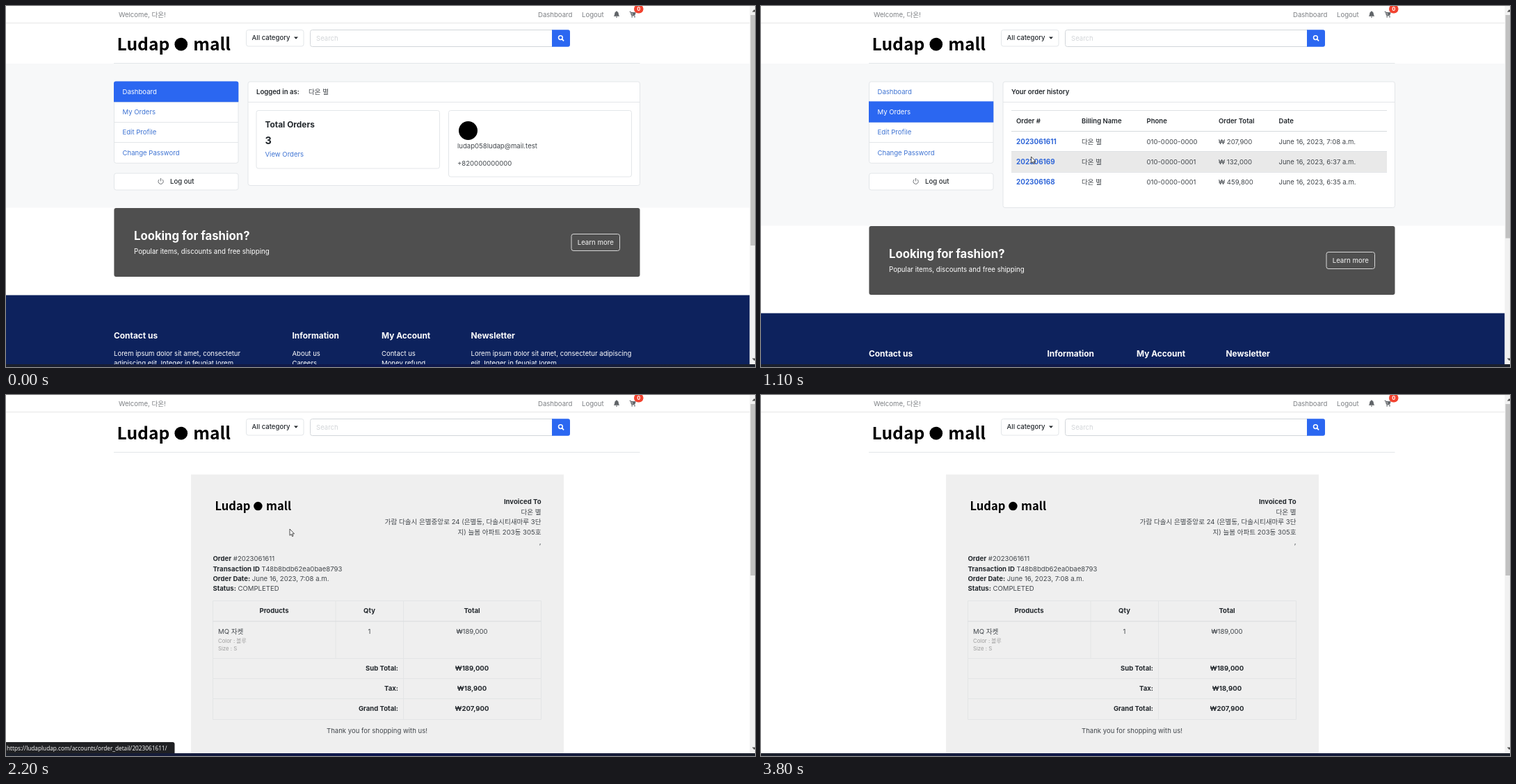
Write an HTML page that moves like this. It is 1077 px wide and 520 px high and loops after 4000 ms.

```html
<!DOCTYPE html>
<html lang="en">
<head>
<meta charset="utf-8">
<title>Shop account</title>
<style>
  html, body { margin: 0; width: 100%; height: 100%; overflow: hidden; background: #fff; }
  svg { display: block; width: 1077px; height: 520px; }
  text { font-family: Inter, 'Noto Sans CJK KR', 'Noto Sans CJK JP', 'Noto Sans CJK', sans-serif; white-space: pre; }
  .brand { font-family: 'Noto Sans CJK KR', 'Noto Sans CJK JP', 'Noto Sans CJK', sans-serif; }
  .url { font-family: 'Open Sans', 'Noto Sans', sans-serif; }
</style>
</head>
<body>
<svg id="stage" viewBox="0 0 1077 520" xmlns="http://www.w3.org/2000/svg"></svg>
<script>
const REM = 9.57, INK = '#42474c', DARK = '#23282d', MUTED = '#7c7f83';
const BLUE = '#2b67f1', LINK = '#3f74d3', LINE = '#e3e6e9', GREY = '#f7f8f9';
const PAGE_RIGHT = 1069.5;

const text = (x, y, str, { size = REM, weight = 400, fill = INK, anchor = 'start', cls = '', id = '' } = {}) =>
  `<text x="${x}" y="${y}" font-size="${size}" font-weight="${weight}" fill="${fill}" text-anchor="${anchor}" class="${cls}" id="${id}">${str}</text>`;
const bold = (x, y, str, opt = {}) => text(x, y, str, { weight: 700, fill: DARK, ...opt });
const rect = (x, y, x2, y2, fill, stroke = 'none', r = 0, extra = '') =>
  `<rect x="${x}" y="${y}" width="${x2 - x}" height="${y2 - y}" rx="${r}" fill="${fill}" stroke="${stroke}" ${extra}/>`;
const card = (x, y, x2, y2) => rect(x, y, x2, y2, '#fff', LINE, 3);
const path = (d, fill, stroke = 'none', width = 1) =>
  `<path d="${d}" fill="${fill}" stroke="${stroke}" stroke-width="${width}"/>`;
const line = (d, stroke = LINE) => path(d, 'none', stroke);
const dot = (x, y, r, fill = '#000') => `<circle cx="${x}" cy="${y}" r="${r}" fill="${fill}"/>`;
const group = (id, body) => `<g id="${id}">${body}</g>`;

const brand = (x, y, size) => {
  const opt = { size, weight: 700, fill: '#000', cls: 'brand' };
  return text(x, y, 'Ludap', opt) + dot(x + size * 3.75, y - size * 0.36, size * 0.38) +
    text(x + size * 4.46, y, 'mall', opt);
};

function header() {
  const nav = { fill: MUTED };
  return line(`M0 24.5H${PAGE_RIGHT}`, '#e6e6e6') +
    text(162, 15.5, 'Welcome, 다온!', nav) +
    text(765, 15.5, 'Dashboard', nav) + text(828, 15.5, 'Logout', nav) +
    path('M873.8 14.8q1.4-1.3 1.4-3.8 0-2.5 2.2-2.9v-.8h1.2v.8q2.2.4 2.2 2.9 0 2.5 1.4 3.8zM876.8 15.5h2.4q-.2 1.2-1.2 1.2t-1.2-1.2z', '#606468') +
    path('M896.6 8.2h1.6l1.3 5.6h5M898.6 9.4h6.6l-.8 3h-5z', '#606468', '#606468', 0.9) +
    dot(900.2, 15.6, 0.9, '#606468') + dot(904, 15.6, 0.9, '#606468') +
    rect(903, -2, 916.5, 10.5, '#f2422f', 'none', 6.2) +
    text(909.7, 7.4, '0', { size: 7.4, weight: 700, fill: '#fff', anchor: 'middle' }) +
    brand(159.5, 64, 24.6) +
    rect(345.5, 34.5, 428, 58, '#fff', LINE, 3) +
    text(353.5, 49.3, 'All category', { weight: 500, fill: DARK }) +
    path('M414 44.5h6l-3 3.2z', DARK) +
    rect(437.5, 34.5, 788, 58.5, '#fff', '#d2d6da', 3) +
    text(446, 49.8, 'Search', { fill: '#d3d6d9' }) +
    path('M785 34.2h23q3 0 3 3v18.5q0 3-3 3h-23z', BLUE) +
    `<circle cx="797.4" cy="45.6" r="2.9" fill="none" stroke="#fff" stroke-width="1.5"/>` +
    path('M799.4 47.7l2.7 2.7', 'none', '#fff', 1.7) +
    line('M155 82.5H911.5');
}

function sidebar(active) {
  const names = ['Dashboard', 'My Orders', 'Edit Profile', 'Change Password'];
  const itemTop = i => 108.6 + i * 29.35;
  const labels = names.map((name, i) =>
    text(167.5, itemTop(i) + 17.9, name, { fill: i === active ? '#fff' : LINK })).join('');
  const top = itemTop(active), end = top + 29.7;
  const highlight = active
    ? rect(155, top - 0.6, 334.3, end, BLUE)
    : path(`M155 ${end}V${top + 3}q0-3 3-3h173.3q3 0 3 3V${end}z`, BLUE);
  return card(155.5, 109, 334, 226.3) +
    line('M155 138.5H334M155 167.5H334M155 196.5H334') + highlight + labels +
    card(155.5, 241, 334, 265) +
    path('M220.6 249.8a3.6 3.6 0 1 0 4 0M222.6 248v4.4', 'none', '#6c7074', 1) +
    text(236, 256.2, 'Log out', { weight: 500, fill: DARK });
}

const panel = (bottom, title) =>
  card(348, 109, 911.5, bottom) + line('M348 138.5H911.5') + bold(360, 126.7, title, { weight: 600 });

function dashboard() {
  return rect(0, 83, PAGE_RIGHT, 290.5, GREY) + sidebar(0) +
    panel(258.5, 'Logged in as:') + text(435, 126.7, '다온 별') +
    card(360, 150.5, 623.5, 234) + card(636.5, 150.5, 899.5, 246) +
    bold(372.5, 175.2, 'Total Orders', { size: 11.9 }) +
    bold(372.5, 198.7, '3', { size: 14.4 }) +
    text(372.5, 217.1, 'View Orders', { fill: LINK, id: 'viewLink' }) +
    dot(664.5, 179.5, 13.5) +
    text(649, 205.3, 'ludap058ludap@mail.test') +
    text(649, 229.6, '+820000000000');
}

function orders() {
  const cols = [367, 461, 554.5, 658, 744.5];
  const heads = ['Order #', 'Billing Name', 'Phone', 'Order Total', 'Date'];
  const rows = [
    ['2023061611', '010-0000-0000', '207,900', '7:08'],
    ['202306169', '010-0000-0001', '132,000', '6:37'],
    ['202306168', '010-0000-0001', '459,800', '6:35'],
  ];
  const body = rows.map(([id, phone, total, time], i) => {
    const y = 198.5 + i * 29.4;
    const cells = ['다온 별', phone, '₩ ' + total, `June 16, 2023, ${time} a.m.`];
    return bold(cols[0], y, id, { size: 9.9, fill: '#2f66d8' }) +
      cells.map((cell, c) => text(cols[c + 1], y, cell)).join('');
  }).join('');
  return rect(0, 83, PAGE_RIGHT, 316.5, GREY) + sidebar(1) +
    panel(290.5, 'Your order history') +
    rect(360, 180, 900, 209.4, '#e9e9e9', 'none', 0, 'id="rowHover"') +
    line('M360 150.5H900M360 209.5H900M360 239.5H900', '#dee1e4') + line('M360 180.5H900', '#d6dadd') +
    heads.map((head, i) => bold(cols[i], 168.6, head, { weight: 600 })).join('') + body;
}

function invoice() {
  const right = { anchor: 'end' }, mid = { anchor: 'middle' };
  const pair = (y, label, value) =>
    text(297.5, y, `<tspan font-weight="700" fill="${DARK}">${label}</tspan> ${value}`);
  const totals = [['Sub Total:', '₩189,000'], ['Tax:', '₩18,900'], ['Grand Total:', '₩207,900']];
  const small = { size: 7.75, fill: '#9c9c9c' };
  return rect(266, 114.5, 802, 523, '#efefef') + brand(300.5, 166, 16.5) +
    bold(769.5, 157.3, 'Invoiced To', right) +
    text(769.5, 171.7, '다온 별', right) +
    text(769.5, 186, '가람 다솔시 은별중앙로 24 (은별동, 다솔시티새마루 3단', right) +
    text(769.5, 200.5, '지) 늘봄 아파트 203동 305호', right) +
    text(769.5, 215, ',', right) +
    pair(239.4, 'Order', '#2023061611') +
    pair(253.7, 'Transaction ID', 'T48b8bdb62ea0bae8793') +
    pair(268, 'Order Date:', 'June 16, 2023, 7:08 a.m.') +
    pair(282.4, 'Status:', 'COMPLETED') +
    line('M297.5 296.5H769.5V467.5H297.5zM297.5 379.5H769.5M297.5 408.5H769.5M297.5 437.5H769.5M474 296.5V379.5M571.5 296.5V467.5', '#e3e5e6') +
    line('M297.5 326H769.5', '#d8dbdd') +
    bold(385.5, 314, 'Products', mid) + bold(522.5, 314, 'Qty', mid) + bold(670, 314, 'Total', mid) +
    text(305, 343.7, 'MQ 자켓') +
    text(305, 356.7, 'Color : 블루', small) + text(305, 368.2, 'Size : S', small) +
    text(522.5, 343.7, '1', mid) + text(670, 343.7, '₩189,000', mid) +
    totals.map(([label, value], i) =>
      bold(564, 396.6 + i * 29.3, label, right) + bold(670, 396.6 + i * 29.3, value, mid)).join('') +
    text(533.5, 487.4, 'Thank you for shopping with us!', mid);
}

// Banner and footer, with the banner's top edge at y = 0.
function bottom() {
  const white = { fill: '#fff' };
  const columns = [
    [155, 'Contact us', 'Lorem ipsum dolor sit amet, consectetur', 'adipiscing elit. Integer in feugiat lorem.'],
    [411.5, 'Information', 'About us', 'Careers'],
    [540, 'My Account', 'Contact us', 'Money refund'],
    [668.5, 'Newsletter', 'Lorem ipsum dolor sit amet, consectetur adipiscing', 'elit. Integer in feugiat lorem.'],
  ];
  return rect(155.4, 0, 911.5, 99, '#4f4f4f', 'none', 3) +
    bold(184, 46, 'Looking for fashion?', { size: 16.7, ...white }) +
    text(184, 66.4, 'Popular items, discounts and free shipping', { size: 9.68, ...white }) +
    rect(813, 37.5, 882.5, 61.5, 'none', '#d8d8d8', 3) +
    text(847.8, 52.9, 'Learn more', { weight: 500, fill: '#e2e2e2', anchor: 'middle' }) +
    rect(0, 125.5, PAGE_RIGHT, 420, '#0d225d') +
    columns.map(([x, title, a, b]) => bold(x, 188.3, title, { size: 11.9, ...white }) +
      text(x, 212.6, a, white) + text(x, 227, b, white)).join('');
}

const chrome = rect(PAGE_RIGHT, 0, 1077, 517, '#f1f1f1') +
  rect(1070.5, 13, 1077, 345, '#c1c1c1', 'none', 0, 'id="thumb"') +
  path('M1072.8 8.6l3.2-3.6 3.2 3.6z M1072.8 507.5l3.2 3.6 3.2-3.6z', '#505050') +
  group('status', path('M0 500H240q3 0 3 3V517H0z', '#202124') +
    text(1, 511.8, '', { size: 8.25, fill: '#fff', cls: 'url', id: 'url' })) +
  `<linearGradient id="bar"><stop stop-color="#1b202b"/><stop offset=".5" stop-color="#0d1750"/><stop offset="1" stop-color="#1b202b"/></linearGradient>` +
  rect(0, 516, 1077, 520, 'url(#bar)') +
  group('arrow', path('M0 0V9.3L2.1 7.4 3.6 10.7 5 10.1 3.6 6.9H6.5Z', '#fff', '#222', 0.8)) +
  group('hand', path('M-1 1a1 1 0 0 1 2 0V4.4l3.2.8q1.3.4 1.2 1.8L4.8 10 4.2 12.3H-.8L-4 8.4q-.6-1.1.6-1.4L-1 8.2Z', '#fff', '#222', 0.8) +
    path('M1 4.4v2M2.7 4.9v1.7M4.2 5.3v1.6', 'none', '#222', 0.6));

document.getElementById('stage').innerHTML = rect(0, 0, 1077, 520, '#fff') +
  group('page', group('dashboard', dashboard()) + group('orders', orders()) +
    group('invoice', invoice()) + header() + group('bottom', bottom())) + chrome;

const $ = id => document.getElementById(id);
const PAGES = {
  dashboard: { bannerTop: 291, thumb: 332 },
  orders: { bannerTop: 317, thumb: 321.5 },
  invoice: { bannerTop: 556.5, thumb: 247 },
};
const SITE = 'https://ludapludap.com/accounts/';
const URLS = { list: [SITE + 'my_orders/', 186], detail: [SITE + 'order_detail/2023061611/', 242.5] };

// start ms, page, pointer, x, y, status address, scroll
const STEPS = [
  [0, 'dashboard'],
  [300, 'dashboard', 'arrow', 760, 330],
  [400, 'dashboard', 'arrow', 610, 290],
  [500, 'dashboard', 'arrow', 500, 255],
  [600, 'dashboard', 'arrow', 425, 230],
  [700, 'dashboard', 'arrow', 396, 221],
  [800, 'dashboard', 'hand', 388.5, 217, 'list'],
  [1100, 'orders', 'arrow', 388.5, 217],
  [1300, 'orders', 'arrow', 393, 211],
  [1400, 'orders', 'arrow', 397, 205],
  [1500, 'orders', 'arrow', 398.5, 202.5],
  [1800, 'orders', 'arrow', 403, 199.5],
  [1900, 'orders', 'hand', 408, 193, 'detail'],
  [2200, 'invoice', 'arrow', 408, 193, 'detail'],
  [2300, 'invoice', 'arrow', 520, 192, 'detail'],
  [2400, 'invoice', 'arrow', 710, 190],
  [2500, 'invoice', 'arrow', 794, 188.5, , 56],
  [2600, 'invoice', 'arrow', 794, 188.5, , 142.5],
  [3000, 'invoice', 'arrow', 794, 188.5, , 56],
  [3100, 'invoice', 'arrow', 794, 188.5],
  [3200, 'invoice', 'arrow', 940, 196],
  [3300, 'invoice'],
];

const show = (id, on) => $(id).setAttribute('visibility', on ? 'visible' : 'hidden');
const move = (id, x, y) => $(id).setAttribute('transform', `translate(${x} ${y})`);

function render(ms) {
  const [, page, pointer, x, y, address, scroll = 0] = STEPS.findLast(step => step[0] <= ms);
  const { bannerTop, thumb } = PAGES[page];
  for (const name in PAGES) $(name).style.display = name === page ? '' : 'none';
  move('page', 0, -scroll);
  move('bottom', 0, bannerTop);
  $('thumb').setAttribute('height', thumb);
  $('thumb').setAttribute('y', 13 + scroll * 0.477);

  for (const kind of ['arrow', 'hand']) {
    show(kind, kind === pointer);
    if (kind === pointer) move(kind, x, y);
  }
  const row = Math.floor((y - 180) / 29.4);
  $('rowHover').style.display = row >= 0 && row < 3 ? '' : 'none';
  if (row >= 0) $('rowHover').setAttribute('y', 180 + row * 29.4);
  $('viewLink').setAttribute('fill', pointer === 'hand' ? '#2450a5' : LINK);

  show('status', address);
  if (address) {
    const [url, width] = URLS[address];
    $('url').textContent = url;
    $('status').firstChild.setAttribute('d', `M0 500H${width - 3}q3 0 3 3V517H0z`);
  }
}

const start = performance.now();
function tick() {
  render((performance.now() - start) % 4000);
  requestAnimationFrame(tick);
}
tick();
</script>
</body>
</html>
```
